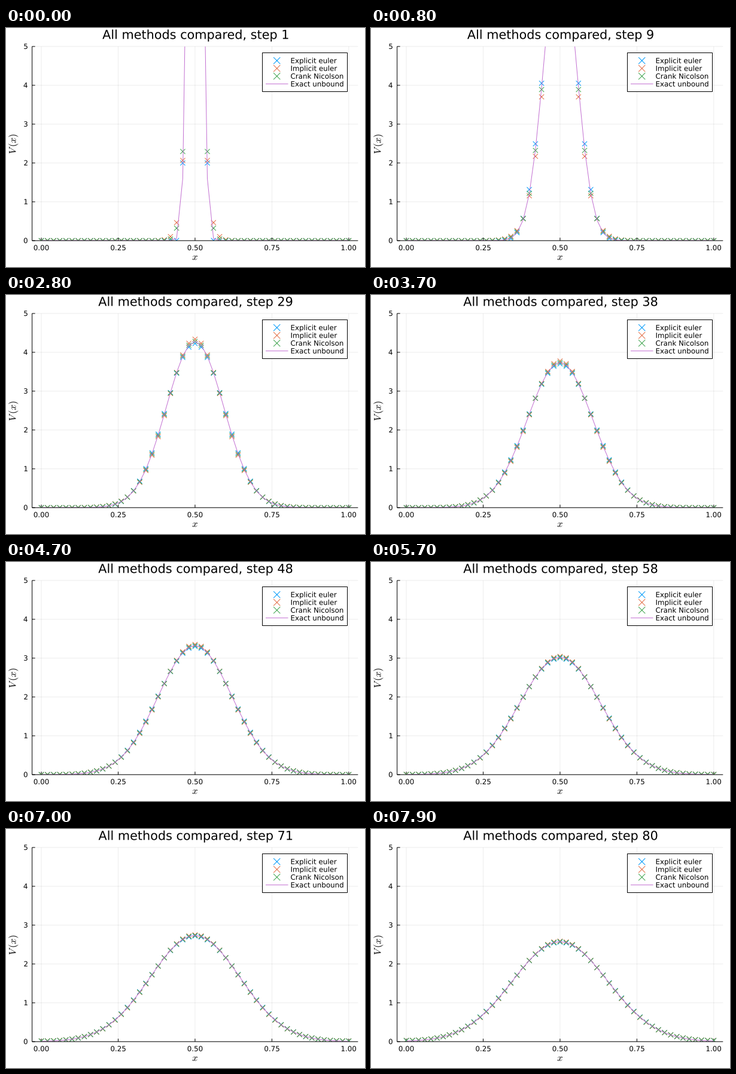
Recreate the animation shown at these times as a matplotlib script. Size 600 by 400 pixels, loop 8000 ms.

```python
import numpy as np
import matplotlib.pyplot as plt
from matplotlib.animation import FuncAnimation
from matplotlib.patches import PathPatch, Rectangle
from matplotlib.textpath import TextPath
from matplotlib.transforms import Affine2D

W, H, DPI = 600, 400, 100
PT = 72 / DPI
STEPS, DELAY = 80, 100
LEFT, RIGHT, TOP, BOTTOM = 43.6, 588.3, 30.9, 355.9
BLUE, RED = (0, 0.6056, 0.9787), (0.8889, 0.4356, 0.2781)
GREEN, PURPLE = (0.2422, 0.6433, 0.3044), (0.7644, 0.4441, 0.8243)
SMALL, MATH, LARGE = 11.87, 16.3, 20.78

plt.rcParams.update({"font.family": "DejaVu Sans", "mathtext.fontset": "cm"})

# Heat equation on [0, 1] with reflecting ends, started from a narrow peak.
N = 51
DX = 1 / (N - 1)
RATIO = 0.375
x = np.linspace(0, 1, N)
lap = -2 * np.eye(N) + np.eye(N, k=1) + np.eye(N, k=-1)
lap[0, 1] = lap[-1, -2] = 2
eye = np.eye(N)

start = np.exp(-((x - 0.5) / 0.01) ** 2 / 2)
start /= start.sum() * DX


def evolve(matrix):
    rows = [start]
    for _ in range(STEPS):
        rows.append(matrix @ rows[-1])
    return np.array(rows)


explicit = evolve(eye + RATIO * lap)
implicit = evolve(np.linalg.inv(eye - RATIO * lap))
crank = evolve(np.linalg.solve(eye - RATIO / 2 * lap, eye + RATIO / 2 * lap))


def exact(step):
    s = RATIO * DX ** 2 * step
    return np.exp(-(x - 0.5) ** 2 / (4 * s)) / np.sqrt(4 * np.pi * s)


def px(u):
    return LEFT + (np.asarray(u) + 0.03) / 1.06 * (RIGHT - LEFT)


def py(v):
    return BOTTOM - np.asarray(v) / 5 * (BOTTOM - TOP)


def crosses(cx, cy, half):
    """Both diagonals of every cross as one broken line."""
    cx, cy = np.atleast_1d(cx), np.atleast_1d(cy)
    dx = half * np.array([-1, 1, np.nan, -1, 1, np.nan])
    dy = half * np.array([-1, 1, np.nan, 1, -1, np.nan])
    return (cx[:, None] + dx).ravel(), (cy[:, None] + dy).ravel()


fig = plt.figure(figsize=(W / DPI, H / DPI), dpi=DPI, facecolor="white")
ax = fig.add_axes([0, 0, 1, 1])
ax.set_xlim(0, W)
ax.set_ylim(H, 0)
ax.axis("off")


def stroke(xs, ys, color="black", width=1.0, z=2, **kw):
    return ax.plot(xs, ys, color=color, lw=width * PT, zorder=z, snap=False,
                   solid_capstyle="butt", **kw)[0]


def outline(text, size, tx, ty, align="left", middle=False, angle=0):
    """Text as a path, placed by its baseline or by its middle."""
    flip = Affine2D().scale(1, -1).rotate_deg(-angle)
    path = flip.transform_path(TextPath((0, 0), text, size=size))
    box = path.get_extents()
    dx = {"left": 0, "center": (box.x0 + box.x1) / 2, "right": box.x1}[align]
    dy = (box.y0 + box.y1) / 2 if middle else 0
    return Affine2D().translate(tx - dx, ty - dy).transform_path(path)


def label(*args, **kw):
    return ax.add_patch(PathPatch(outline(*args, **kw), fc="black", lw=0,
                                  zorder=8, snap=False))


# Grid, ticks and tick labels
for u in np.linspace(0, 1, 5):
    gx = float(px(u))
    stroke([gx, gx], [TOP, BOTTOM], width=0.7, alpha=0.1, z=1)
    stroke([gx, gx], [BOTTOM, BOTTOM - 5])
    label(f"{u:.2f}", SMALL, gx, 371.9, "center")
for v in range(6):
    gy = float(py(v))
    stroke([LEFT, RIGHT], [gy, gy], width=0.7, alpha=0.1, z=1)
    stroke([LEFT, LEFT + 5], [gy, gy])
    label(str(v), SMALL, 35.8, gy + 4.1, "right")
stroke([LEFT, LEFT], [TOP, BOTTOM], z=5)
stroke([LEFT, RIGHT], [BOTTOM, BOTTOM], z=5)

label("$x$", MATH, 315.8, 384.5, "center", middle=True)
label(r"$V\,(x)$", MATH, 12.2, 194.3, "center", middle=True, angle=90)
title = label("All methods compared", LARGE, 316.4, 18.3, "center")

# Curves
window = Rectangle((LEFT, TOP), RIGHT - LEFT, BOTTOM + 0.4 - TOP,
                   transform=ax.transData)
series = [(explicit, BLUE, "Explicit euler"),
          (implicit, RED, "Implicit euler"),
          (crank, GREEN, "Crank Nicolson")]
marks = [stroke([], [], color, z=3) for _, color, _ in series]
curve = stroke([], [], PURPLE, z=4)
for line in marks + [curve]:
    line.set_clip_path(window)

# Legend
ax.add_patch(Rectangle((428.5, 41.5), 142, 65, fc="white", ec="black",
                       lw=PT, zorder=6, snap=False))
for i, (_, color, name) in enumerate(series):
    row = 54.6 + 13 * i
    stroke(*crosses(452.7, row, 5.6), color, z=7)
    label(name, SMALL, 475.5, row + 4.2)
stroke([434, 471.5], [93.6, 93.6], PURPLE, z=7)
label("Exact unbound", SMALL, 475.5, 97.8)


def update(frame):
    step = frame + 1
    title.set_path(outline(f"All methods compared, step {step}", LARGE,
                           316.4, 18.3, "center"))
    for line, (data, _, _) in zip(marks, series):
        v = data[step]
        seen = v <= 5
        line.set_data(*crosses(px(x[seen]), py(v[seen]), 4.1))
    curve.set_data(px(x), py(exact(step)))
    return [title, curve, *marks]


anim = FuncAnimation(fig, update, frames=STEPS, interval=DELAY,
                     repeat=True, repeat_delay=0, blit=False)
plt.show()
```
